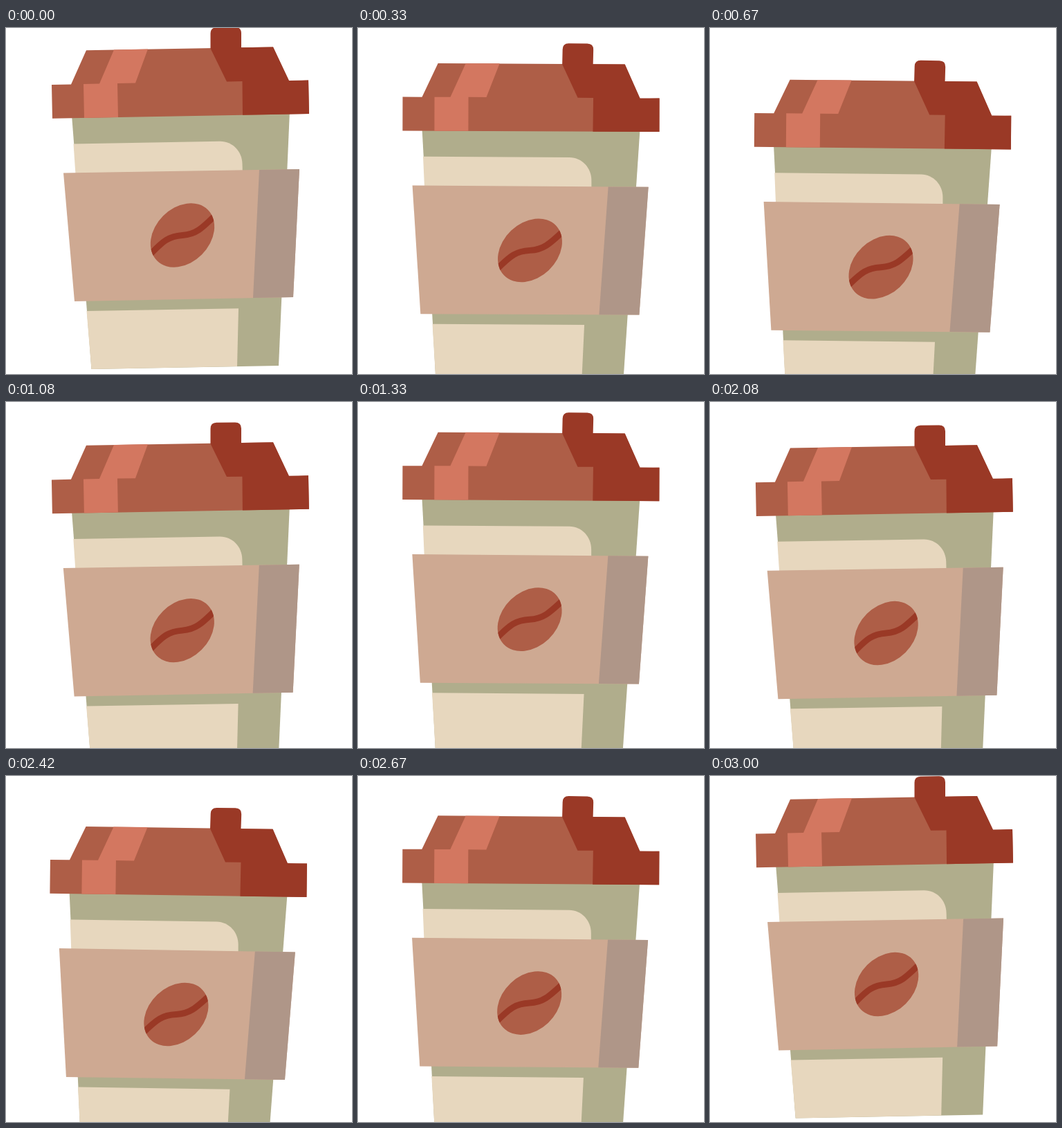
An HTML page that plays this animation: 500 by 500 pixels, repeating every 3.08 s.

```html
<!DOCTYPE html>
<html lang="en">
<head>
<meta charset="utf-8">
<title>Coffee cup</title>
<style>
  html, body { margin: 0; width: 100%; height: 100%; overflow: hidden; background: #fff; }
  svg { display: block; width: 100%; height: 100%; }
</style>
</head>
<body>
<svg viewBox="0 0 500 500">
  <defs>
    <clipPath id="beanClip">
      <ellipse cx="255" cy="299.5" rx="52" ry="39.5" transform="rotate(-45 255 299.5)"/>
    </clipPath>
  </defs>
  <g id="cup">
    <!-- body -->
    <path fill="#b0ad8c" d="M95 126L410 120L394 488L123.5 493Z"/>
    <path fill="#e7d7be" d="M97.5 167.5L309 163.8C327 163.5 341 178 341.5 196L342 215L101 219Z"/>
    <path fill="#e7d7be" d="M116.5 409L336 405.3L334 489.1L123.5 493Z"/>
    <!-- sleeve -->
    <path fill="#cea992" d="M83 209.5L424 204L415 389L99 395Z"/>
    <path fill="#af9688" d="M366 205L424 204L415 389L357 390Z"/>
    <!-- bean -->
    <g clip-path="url(#beanClip)">
      <rect x="200" y="245" width="110" height="110" fill="#ae5e47"/>
      <path fill="none" stroke="#9a3926" stroke-width="9" d="M204 332C228 306 236 301 255 299.5S282 291 306 267"/>
    </g>
    <!-- lid -->
    <path fill="#ae5e47" d="M116 32.3L386 27.5L409 77L437 75.5L438 124L67 130.8L66 82L94 81.4Z"/>
    <path fill="#d37760" d="M156 31.5L205 30.5L187 79.6L161 80L162 129L113 130L112 81L135 80.5Z"/>
    <path fill="#9a3926" d="M295.5 29.5V8Q295.5 -.5 304 -.8L331 -1.2Q340 -1.2 340 7.5V28.3L386 27.5L409 76L437 75.5L438 124L342 125.8L341.5 77L319 77.4Z"/>
  </g>
</svg>
<script>
  const LOOP = 3080, FPS = 12, SWING = 11.85;
  const cup = document.getElementById('cup');

  // Turning points of the bob: [step, drop in px]
  const BOB = [[0, 0], [8.3, 46.3], [19, 7.6], [28.4, 45.5], [37, 0]];

  function drop(step) {
    const i = BOB.findIndex(p => p[0] > step);
    const [a, from] = BOB[i - 1], [b, to] = BOB[i];
    const ease = (1 - Math.cos(Math.PI * (step - a) / (b - a))) / 2;
    return from + (to - from) * ease;
  }

  const sway = step => -Math.cos(2 * Math.PI * (step - 0.4) / SWING);

  function draw(ms) {
    const step = Math.min(36, Math.floor((ms % LOOP) * FPS / 1000 + 0.05));
    const tilt = sway(step) - sway(0);
    cup.setAttribute('transform',
      `translate(0 ${drop(step).toFixed(2)}) rotate(${tilt.toFixed(3)} 250 15)`);
  }

  let start;
  function tick(now) {
    start ??= now;
    draw(now - start);
    requestAnimationFrame(tick);
  }
  draw(0);
  requestAnimationFrame(tick);
</script>
</body>
</html>
```
